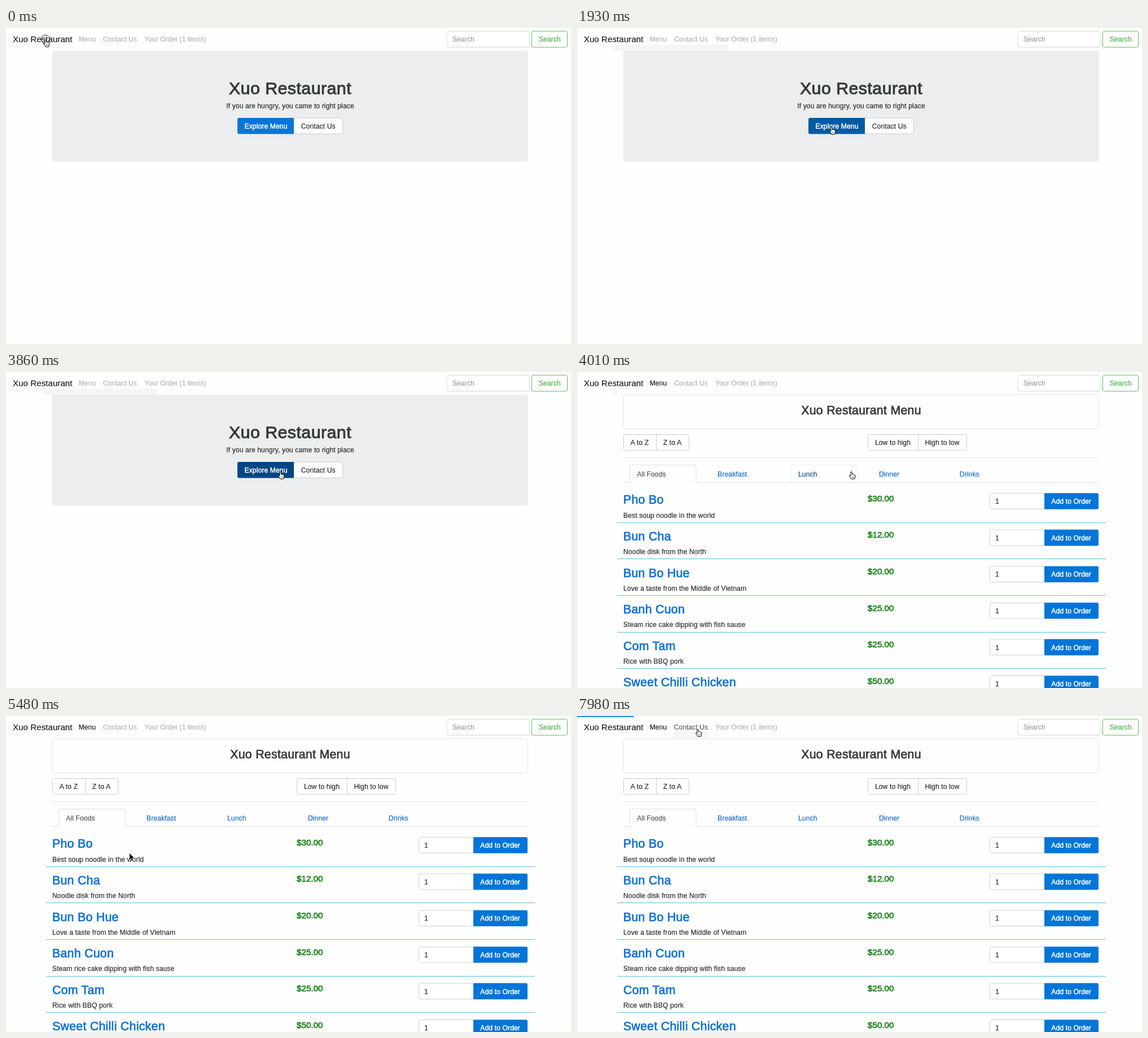
Recreate the animation shown at these times as an HTML page. Size 1001 by 559 pixels, loop 8000 ms.

```html
<!DOCTYPE html>
<html lang="en">
<head>
<meta charset="utf-8">
<title>Restaurant menu</title>
<style>
html, body { margin: 0; width: 100%; height: 100%; overflow: hidden; background: #fefefe; }
svg { display: block; width: 1001px; height: 559px; }
text {
  font: 12.15px "Liberation Sans", Arial, sans-serif;
  color: #25272a; fill: currentColor; stroke: currentColor; stroke-width: .15px;
  letter-spacing: .008em; white-space: pre;
}
.nav { color: #b2b2b2; letter-spacing: 0; }
.brand { font-size: 15.19px; letter-spacing: 0; }
.brand, .nav.on { color: #1a1a1a; }
.nav.hover { color: #5c5c5c; }
.h1, .h3 { color: #343739; letter-spacing: .014em; }
.h1 { font-size: 30.4px; stroke-width: .9px; }
.h3 { font-size: 21.27px; stroke-width: .7px; }
.price { font-size: 15.19px; color: #067a06; stroke-width: .5px; letter-spacing: 0; }
.dish { color: #0a6fd8; }
.link { color: #0a64d4; }
.link.on { color: #014c8c; }
.white { color: #fff; stroke-width: .45px; }
.green { color: #5cb85c; stroke-width: .35px; }
.hint { color: #999; }
.tab { color: #4b4f52; }
.mid { text-anchor: middle; }
</style>
</head>
<body>
<script>
const NS = 'http://www.w3.org/2000/svg';
const LOOP = 8000;
const TICK = 147.3;
const NAME = 'Xuo Restaurant';
const BLUE = '#0275d8';
const PAGE = '#fefefe';

function add(parent, tag, attrs, content) {
  const node = document.createElementNS(NS, tag);
  for (const key in attrs) node.setAttribute(key, attrs[key]);
  if (content) node.textContent = content;
  return parent.appendChild(node);
}
const label = (p, x, y, content, cls = '') => add(p, 'text', { x, y, class: cls }, content);
const box = (p, x, y, width, height, fill, stroke = 'none', rx = 0) =>
  add(p, 'rect', { x, y, width, height, fill, stroke, rx });
const path = (p, d, fill, stroke = 'none', width = 1) =>
  add(p, 'path', { d, fill, stroke, 'stroke-width': width });
const rule = (p, x1, x2, y, stroke) => path(p, `M${x1} ${y}H${x2}`, 'none', stroke);
const leftRound = (x, y, w, h) =>
  `M${x + w} ${y}H${x + 3}q-3 0-3 3v${h - 6}q0 3 3 3H${x + w}Z`;
const rightRound = (x, y, w, h) =>
  `M${x} ${y}H${x + w - 3}q3 0 3 3v${h - 6}q0 3-3 3H${x}Z`;
const tabShape = x => `M${x} 195.5v-28q0-3 3-3h111.5q3 0 3 3v28`;

const svg = add(document.body, 'svg', { viewBox: '0 0 1001 559' });
box(svg, 0, 0, 1001, 559, PAGE);

// Shades left under the navigation
const trail = box(svg, 65, 30, 203, 10, '#f5f5f6');
const stub = box(svg, 65, 27, 6, 13, '#f5f5f6');
const shade = box(svg, 172, 25, 61, 15, '#f7f7f7');

// Navigation
label(svg, 12, 25, NAME, 'brand');
const navMenu = label(svg, 128.7, 24.3, 'Menu', 'nav');
const navContact = label(svg, 171.7, 24.3, 'Contact Us', 'nav');
label(svg, 245.3, 24.3, 'Your Order (1 items)', 'nav');
box(svg, 781, 5.5, 146, 28.5, '#fff', '#d6d6d6', 3);
label(svg, 790.7, 24.3, 'Search', 'hint');
box(svg, 931.5, 5.5, 63, 28.5, '#fff', '#5cb85c', 3);
label(svg, 943.7, 24.3, 'Search', 'green');

// Home page
const home = add(svg, 'g');
box(home, 82, 40.3, 843, 196, '#ebedee', 'none', 4.5);
label(home, 503.5, 117, NAME, 'h1 mid');
label(home, 503.5, 142.2, 'If you are hungry, you came to right place', 'mid');
const contact = path(home, rightRound(509.5, 159.3, 87, 28), '#fff', '#ccc');
const explore = path(home, leftRound(410, 159, 100, 28.5), BLUE);
label(home, 422.5, 177.7, 'Explore Menu', 'white');
label(home, 522.7, 177.7, 'Contact Us');

// Menu page
const menu = add(svg, 'g');
box(menu, 82.5, 40.5, 842, 60, PAGE, '#e4e4e4', 3);
label(menu, 503.5, 75.3, NAME + ' Menu', 'h3 mid');

function buttonPair(x, split, width, first, second) {
  box(menu, x + .5, 110.5, width, 28, '#fff', '#ccc', 3);
  path(menu, `M${split + .5} 110.5v28`, 'none', '#ccc');
  label(menu, (x + split) / 2, 129.2, first, 'mid');
  label(menu, (split + x + width) / 2, 129.2, second, 'mid');
}
buttonPair(82, 140, 116, 'A to Z', 'Z to A');
buttonPair(515, 604, 175, 'Low to high', 'High to low');

rule(menu, 82, 925, 151.5, '#e5e5e5');
rule(menu, 82, 925, 195.5, '#ddd');
path(menu, tabShape(93.5), PAGE, '#ddd');
rule(menu, 94, 210.5, 195.5, PAGE);
const lunchTab = path(menu, tabShape(379.5), 'none', '#eceeef');
const tabs = ['All Foods', 'Breakfast', 'Lunch', 'Dinner', 'Drinks'].map((name, i) =>
  label(menu, 106.2 + i * 142.9, 184.7, name, i ? 'link' : 'tab'));

[
  ['Pho Bo', 30, 'Best soup noodle in the world'],
  ['Bun Cha', 12, 'Noodle disk from the North'],
  ['Bun Bo Hue', 20, 'Love a taste from the Middle of Vietnam'],
  ['Banh Cuon', 25, 'Steam rice cake dipping with fish sause'],
  ['Com Tam', 25, 'Rice with BBQ pork'],
  ['Sweet Chilli Chicken', 50, '']
].forEach(([name, price, about], i) => {
  const y = i * 64.6;
  label(menu, 82, 233.3 + y, name, 'h3 dish');
  label(menu, 515, 228.8 + y, `$${price}.00`, 'price');
  label(menu, 82, 257.5 + y, about);
  path(menu, leftRound(731.5, 214.5 + y, 97, 28), '#fff', '#d0d0d0');
  label(menu, 741, 233.2 + y, '1');
  path(menu, rightRound(828, 214.2 + y, 96, 28.6), BLUE);
  label(menu, 840.3, 233.2 + y, 'Add to Order', 'white');
  rule(menu, 71, 937, Math.floor(266.2 + y) + .5, '#5bc0de');
});

const progress = box(svg, 0, 0, 101, 1.7, '#0076ff');

// Pointer, with its hot spot at 0,0
const pointer = add(svg, 'g');
const ring = add(pointer, 'circle', { r: 7.5, fill: 'none', stroke: '#222' });
const arrow = path(pointer, 'M0 0V11.2L2.5 8.8 4.2 12.6 6 11.8 4.4 8.1H7.8Z', '#000', '#fff', .8);
arrow.setAttribute('paint-order', 'stroke');
const hand = add(pointer, 'g');
path(hand, 'M-1.2 1.2Q0-1 1.1 1.2L1.5 5Q3 4 3.6 5.3 5 4.8 5.5 6 7 5.7 7 7.2 7 10 5.7 13.2H0' +
  'Q-1 11-3.6 7.9-3.6 6-1 7.6Z', '#fff', '#000');
path(hand, 'M1.4 8.8v2.5m1.6 0v-2.5m1.6 0v2.5', 'none', '#333', .6);

// Pointer glides: start, end, easing, goal and optional bend
const easeOut = u => 1 - (1 - u) ** 3;
const smooth = u => u * u * (3 - 2 * u);
const glides = [
  { from: 1190, to: 1925, ease: easeOut, goal: [451, 175] },
  { from: 2230, to: 2500, ease: smooth, goal: [549, 176] },
  { from: 2670, to: 3390, ease: smooth, goal: [486, 176] },
  { from: 4600, to: 5460, ease: smooth, goal: [219, 243], bend: [1320, 340] },
  { from: 5480, to: 6780, ease: smooth, goal: [185.5, 59.5], bend: [480, 455] },
  { from: 6790, to: 7080, ease: smooth, goal: [214, 23] }
];

function pointerAt(t) {
  let at = [70, 20];
  for (const { from, to, ease, goal, bend } of glides) {
    if (t <= from) break;
    const u = ease(Math.min(1, (t - from) / (to - from)));
    at = at.map((a, i) => {
      const mid = bend ? bend[i] : (a + goal[i]) / 2;
      return a * (1 - u) ** 2 + 2 * mid * u * (1 - u) + goal[i] * u * u;
    });
  }
  return at;
}

const show = (node, on) => node.setAttribute('visibility', on ? 'visible' : 'hidden');

function draw(t) {
  const within = (from, to) => t >= from && t < to;
  const [x, y] = pointerAt(Math.floor((t - 10) / TICK) * TICK + 10);
  const over = (left, top, right, bottom) => x >= left && x < right && y >= top && y < bottom;
  const atHome = t < 4010;
  const onBrand = over(12, 10, 117, 30);
  const onNav = over(172, 10, 233, 30);
  const onExplore = atHome && over(410, 159, 510, 188);
  const onContact = atHome && over(510, 159, 597, 188);
  const onLunch = !atHome && over(379, 164, 497, 196);
  const pointing = onBrand || onNav || onExplore || onContact || onLunch;

  show(home, atHome);
  menu.style.display = atHome ? 'none' : '';
  navMenu.classList.toggle('on', !atHome);
  navContact.classList.toggle('hover', onNav);
  tabs[2].classList.toggle('on', onLunch);
  explore.setAttribute('fill', t >= 3710 ? '#014682' : onExplore ? '#025aa5' : BLUE);
  contact.setAttribute('fill', onContact ? '#e6e6e6' : '#fff');

  show(lunchTab, onLunch);
  show(trail, within(1340, 4010));
  show(stub, within(4010, 4750));
  show(shade, onNav);
  show(progress, within(4450, 4750) || t >= 7980);

  pointer.setAttribute('transform', `translate(${x} ${y})`);
  show(hand, pointing);
  show(arrow, !pointing);
  show(ring, t < 140 || within(3710, 3860) || within(7380, 7530));
}

const start = performance.now();
function tick() {
  draw((performance.now() - start) % LOOP);
  requestAnimationFrame(tick);
}
tick();
</script>
</body>
</html>
```
